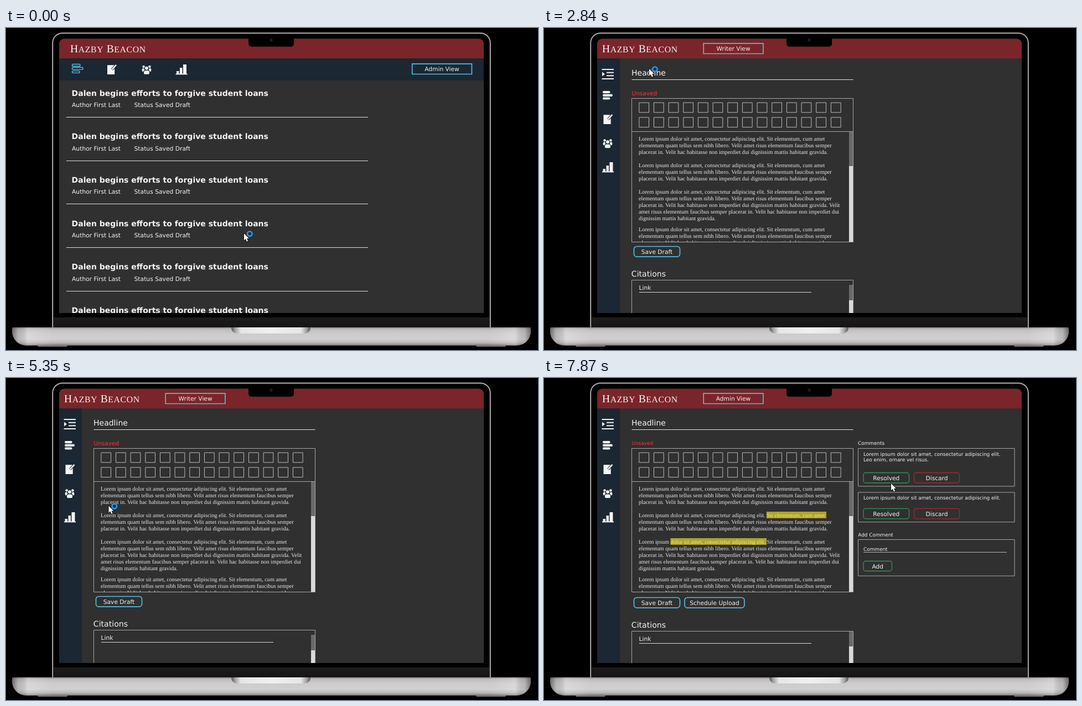
Recreate the animation shown at these times as an HTML page with a canvas. Size 961 px wide and 583 px high, loop 8000 ms.

```html
<!DOCTYPE html>
<html lang="en">
<head>
<meta charset="utf-8">
<title>Newsroom mockup</title>
<style>
  html, body { margin: 0; width: 100%; height: 100%; overflow: hidden; background: #000; }
  canvas { display: block; width: 961px; height: 583px; }
</style>
</head>
<body>
<canvas id="stage" width="961" height="583"></canvas>
<script>
const ctx = document.getElementById('stage').getContext('2d');
const LOOP = 8000, TICK = 148.2;
const EDITOR_AT = 2840, ADMIN_AT = 6840;
const SANS = '"DejaVu Sans", Verdana, sans-serif';
const SERIF = '"Liberation Serif", "Times New Roman", serif';
const C = { red: '#7a2529', navy: '#1b2732', page: '#303030', cyan: '#55bbe0',
            white: '#f4f4f4', body: '#e8e8e8', line: '#a6a6a6', green: '#2f9458', cancel: '#a3282e' };

// ---------- helpers ----------
function rect(x, y, w, h, color) {
  ctx.fillStyle = color;
  ctx.fillRect(x, y, w, h);
}
function round(x, y, w, h, r, color) {
  ctx.fillStyle = color;
  ctx.beginPath();
  ctx.roundRect(x, y, w, h, r);
  ctx.fill();
}
function frame(x, y, w, h, color = C.line, r = 0, width = 1) {
  ctx.strokeStyle = color;
  ctx.lineWidth = width;
  ctx.beginPath();
  ctx.roundRect(x, y, w, h, r);
  ctx.stroke();
}
function text(str, x, y, size, color = C.white, family = SANS, weight = '') {
  ctx.font = `${weight} ${size}px ${family}`;
  ctx.fillStyle = color;
  ctx.fillText(str, x, y);
}
function button(str, x, y, w, h, color, r = 0, width = 1.7) {
  frame(x, y, w, h, color, r, width);
  ctx.textAlign = 'center';
  text(str, x + w / 2, y + h / 2 + 4, 10.65);
  ctx.textAlign = 'left';
}
function gradient(x0, y0, x1, y1, stops) {
  const g = ctx.createLinearGradient(x0, y0, x1, y1);
  stops.forEach(([at, color]) => g.addColorStop(at, color));
  return g;
}
function at(x, y, draw) {
  ctx.save();
  ctx.translate(x, y);
  draw();
  ctx.restore();
}
function dot(x, y, r, color) {
  ctx.fillStyle = color;
  ctx.beginPath();
  ctx.arc(x, y, r, 0, 7);
  ctx.fill();
}

// ---------- laptop ----------
function laptopLid() {
  [[0, '#666'], [0.7, '#b8b8b8'], [2.2, '#000']].forEach(([inset, color]) =>
    round(83 + inset, 8 + inset, 793 - 2 * inset, 560, 19 - inset, color));
}
function laptopBase() {
  round(438, 12, 82, 21.7, [0, 0, 5, 5], '#000');
  dot(479, 22, 2.8, '#1d1d22');
  rect(86, 516, 787, 8, '#000');
  rect(86, 524, 787, 19, gradient(0, 524, 0, 543, [[0, '#1d1d1d'], [1, '#141414']]));
  for (const x of [57, 849]) round(x, 572, 54, 5, 2, '#777');
  const corners = [2, 2, 26, 26];
  round(11, 542, 937, 33, corners, gradient(0, 542, 0, 575,
    [[0, '#8e8c8e'], [0.1, '#c0bdbf'], [0.35, '#cecbcd'], [0.65, '#d2cfd1'],
     [0.84, '#bbb8ba'], [0.95, '#918f91'], [1, '#666']]));
  round(11, 542, 937, 33, corners, gradient(11, 0, 948, 0,
    [[0, 'rgba(0,0,0,.45)'], [0.012, 'rgba(0,0,0,.1)'], [0.03, 'rgba(255,255,255,.22)'],
     [0.08, 'rgba(255,255,255,0)'], [0.92, 'rgba(255,255,255,0)'],
     [0.97, 'rgba(255,255,255,.22)'], [0.988, 'rgba(0,0,0,.1)'], [1, 'rgba(0,0,0,.45)']]));
  round(407, 542, 143, 11, [0, 0, 10, 10], gradient(407, 0, 550, 0,
    [[0, '#555'], [0.05, '#a2a2a2'], [0.12, '#e6e6e6'], [0.5, '#f0f0f0'],
     [0.88, '#e6e6e6'], [0.95, '#a2a2a2'], [1, '#555']]));
}

// ---------- icons, drawn around their centre ----------
function editIcon(x, y) {
  at(x, y, () => {
    rect(-8, -7.8, 13.2, 16.8, C.white);
    ctx.lineCap = 'butt';
    for (const [color, w] of [[C.navy, 4.4], [C.white, 2.5]]) {
      ctx.strokeStyle = color;
      ctx.lineWidth = w;
      ctx.beginPath();
      ctx.moveTo(0.2, 0.4);
      ctx.lineTo(8, -8.2);
      ctx.stroke();
    }
  });
}
function peopleIcon(x, y) {
  at(x, y, () => {
    for (const s of [-1, 1]) {
      dot(5.4 * s, -5.5, 2.3, C.white);
      round(s < 0 ? -8.3 : 4, -2.4, 4.3, 6, 2, C.white);
    }
    dot(0, -2.7, 3.8, C.navy);
    dot(0, -2.7, 3, C.white);
    round(-5.8, 0.8, 11.6, 8, 3.5, C.navy);
    round(-5, 1.6, 10, 6.6, [3.5, 3.5, 2, 2], C.white);
  });
}
function chartIcon(x, y) {
  at(x, y, () => {
    rect(-10.5, 7.6, 21, 1.8, C.white);
    rect(-9, 3, 4.5, 5, C.white);
    rect(-3, -3, 4.5, 11, C.white);
    rect(3, -9, 6, 17, C.white);
  });
}
function indentIcon() {
  rect(104.5, 74, 21.5, 2, C.white);
  rect(113, 79.7, 13, 2, C.white);
  rect(113, 85.3, 13, 2, C.white);
  rect(104.5, 91, 21.5, 2, C.white);
  ctx.fillStyle = C.white;
  ctx.fill(new Path2D('M105 79.5 L110 83.5 L105 87.5Z'));
}

// ---------- shared page parts ----------
function masthead(x) {
  rect(96, 19, 767, 36, C.red);
  ctx.letterSpacing = '0.6px';
  for (const [str, size] of [['H', 19.6], ['AZBY', 15.8], [' B', 19.6], ['EACON', 15.8]]) {
    text(str, x, 44, size, C.white, SERIF);
    x += ctx.measureText(str).width;
  }
  ctx.letterSpacing = '0px';
}

// ---------- article list ----------
function listPage() {
  masthead(116);
  rect(96, 55, 767, 40, C.navy);
  [[65.5, 14.5], [71.3, 19.5], [77.6, 13.5]].forEach(([y, w]) =>
    frame(119.5, y, w, 3.8, C.cyan, 1.9, 1.4));
  editIcon(191, 75);
  peopleIcon(254, 75.5);
  chartIcon(317, 75);
  button('Admin View', 733.7, 64.9, 107.7, 18.6, C.cyan);
  for (let i = 0; i < 6; i++) {
    const y = i * 78.7;
    text('Dalen begins efforts to forgive student loans', 118.6, 122.6 + y, 14, C.white, SANS, 'bold');
    text('Author First Last', 119, 142.9 + y, 10.75);
    text('Status Saved Draft', 231.5, 142.9 + y, 10.75);
    rect(109, Math.round(161 + y), 545, 1, '#dedede');
  }
}

// ---------- editor ----------
const OPEN = 'Lorem ipsum dolor sit amet, consectetur adipiscing elit. Sit elementum, cum amet';
const MID = 'elementum quam tellus sem nibh libero. Velit amet risus elementum faucibus semper';
const END = 'placerat in. Velit hac habitasse non imperdiet dui dignissim mattis habitant gravida.';
const PARAGRAPHS = [
  [204, [OPEN, MID, END]],
  [252, [OPEN, MID, END]],
  [300, [OPEN, MID, END + ' Velit',
    'amet risus elementum faucibus semper placerat in. Velit hac habitasse non imperdiet dui',
    'dignissim mattis habitant gravida.']],
  [368, [OPEN, MID, END]],
];
function scrollbar(top, split, bottom) {
  rect(551, top, 7.5, split - top, '#6a6a6a');
  rect(551, split, 7.5, bottom - split, '#d9d9d9');
}
function body() {
  ctx.save();
  ctx.beginPath();
  ctx.rect(159, 188, 392, 199);
  ctx.clip();
  for (const [y, lines] of PARAGRAPHS)
    lines.forEach((line, i) => text(line, 171, y + i * 12, 10.27, C.body, SERIF));
  ctx.restore();
}
function comment(y, h, lines) {
  frame(567.5, y, 282.5, h);
  lines.forEach((line, i) => text(line, 577, y + 13 + i * 10.6, 8.9));
  button('Resolved', 577, y + h - 24.5, 82.5, 18.5, C.green, 4, 1.3);
  button('Discard', 668.5, y + h - 24.5, 82, 18.5, C.cancel, 4, 1.3);
}
function reviewPanel() {
  const mark = 'rgba(255,235,45,.62)';
  rect(402, 242, 108, 12, mark);
  rect(228.5, 290, 173.5, 12, mark);
  button('Schedule Upload', 254, 397.5, 108, 18.7, C.cyan, 5);
  text('Comments', 567, 120.5, 8.9);
  const lorem = 'Lorem ipsum dolor sit amet, consectetur adipiscing elit.';
  comment(127.5, 68.5, [lorem, 'Leo enim, ornare vel risus.']);
  comment(207, 53.8, [lorem]);
  text('Add Comment', 567.3, 286.6, 8.9);
  frame(567.5, 292.5, 282.5, 65.8);
  text('Comment', 577, 313, 8.9);
  rect(577, 315, 259, 1, '#b4b4b4');
  button('Add', 577, 331.5, 51.5, 18, C.green, 4, 1.3);
}
function editorPage(admin) {
  const drop = admin ? 2 : 0;
  masthead(105);
  rect(96, 55, 41, 461, C.navy);
  indentIcon();
  [[114, 13.5], [119.7, 18], [125.4, 13.5]].forEach(([y, w]) => round(106, y, w, 4.2, 2, C.white));
  editIcon(115.5, 165);
  peopleIcon(115, 209);
  chartIcon(115.5, 252);
  button(admin ? 'Admin View' : 'Writer View', 288.2, 27.9, 107.7, 18.6, C.cyan);

  text('Headline', 158, 86, 14);
  rect(158.5, 93, 400, 1, '#e4e4e4');
  text('Unsaved', 158.5, admin ? 120.5 : 121.6, admin ? 8.9 : 10.5, '#fb333b');
  for (let i = 0; i < 28; i++)
    frame(171.85 + i % 14 * 26.66, i < 14 ? 135.2 : 161.9, 17.7, 17.7, '#bcbcbc');
  rect(159, 187, 399, 1, C.line);
  body();
  scrollbar(188, 250, 387);
  frame(158.5, 127.5, 400, 260);
  button('Save Draft', 162.5, 395.5 + drop, 83, 18.7, C.cyan, 5);

  text('Citations', 157.8, 450 + drop, 14.1);
  scrollbar(admin ? 459 : 465, admin ? 486 : 493, 516);
  frame(158.5, 456.5 + drop, 400, 80);
  text('Link', 171.5, 473.6 + drop, 10.7);
  rect(172, 478 + drop, 311, 1, '#d8d8d8');
  if (admin) reviewPanel();
}

// ---------- pointer: tick, x, y ----------
const PATH = [
  [0, 430, 372], [4, 300, 205], [7, 229, 115], [9, 500, 134], [11, 771, 100],
  [13, 420, 92], [15, 189.5, 73], [18, 189.5, 73], [19, 190, 74], [21, 190, 74],
  [25, 204, 330], [27, 196, 420], [28, 196, 420], [29, 222.5, 418], [31, 514, 420],
  [32, 514, 420], [36, 185.5, 231.5], [40, 117, 166], [41, 115, 161], [46, 115, 161],
  [53, 627, 191],
];
const ARROW = new Path2D('M0 0V12.4L2.8 9.8L4.9 14.6L7 13.7L5 9H8.8Z');
const HAND = new Path2D('M-1.5 1.4Q0-.8 1.5 1.4V6L6.4 7.2Q8 7.6 7.8 9.6L6.6 14V17H-1L-5.3 11Q-5 8.8-3 9.8L-1.5 11.2Z');

function pointerAt(tick) {
  const i = PATH.findIndex(p => p[0] >= tick);
  if (i < 0) return PATH[PATH.length - 1].slice(1);
  if (i === 0) return PATH[0].slice(1);
  const [t0, x0, y0] = PATH[i - 1], [t1, x1, y1] = PATH[i];
  const k = (tick - t0) / (t1 - t0);
  return [x0 + (x1 - x0) * k, y0 + (y1 - y0) * k];
}
function pointer(time) {
  const tick = Math.floor(time / TICK);
  const hand = (tick >= 15 && time < EDITOR_AT) || (tick >= 41 && time < ADMIN_AT);
  const busy = !hand && time < ADMIN_AT;
  at(...pointerAt(tick), () => {
    const shape = hand ? HAND : ARROW;
    ctx.lineJoin = 'round';
    ctx.lineWidth = 1.6;
    ctx.strokeStyle = '#111';
    ctx.stroke(shape);
    ctx.fillStyle = '#fff';
    ctx.fill(shape);
    if (!busy) return;
    dot(10.3, 0.6, 5.7, '#1c84dc');
    dot(10.3, 0.6, 4.8, '#2c9cf2');
    dot(10.3, 0.6, 3, '#20303f');
  });
}

// ---------- loop ----------
function draw(now) {
  const time = now % LOOP;
  ctx.textRendering = 'geometricPrecision';
  rect(0, 0, 961, 583, '#000');
  laptopLid();
  ctx.save();
  ctx.beginPath();
  ctx.roundRect(96, 19.5, 767, 496.5, [9, 9, 0, 0]);
  ctx.clip();
  rect(96, 19, 767, 497, C.page);
  if (time < EDITOR_AT) listPage();
  else editorPage(time >= ADMIN_AT);
  pointer(time);
  ctx.restore();
  laptopBase();
  requestAnimationFrame(draw);
}
requestAnimationFrame(draw);
</script>
</body>
</html>
```
